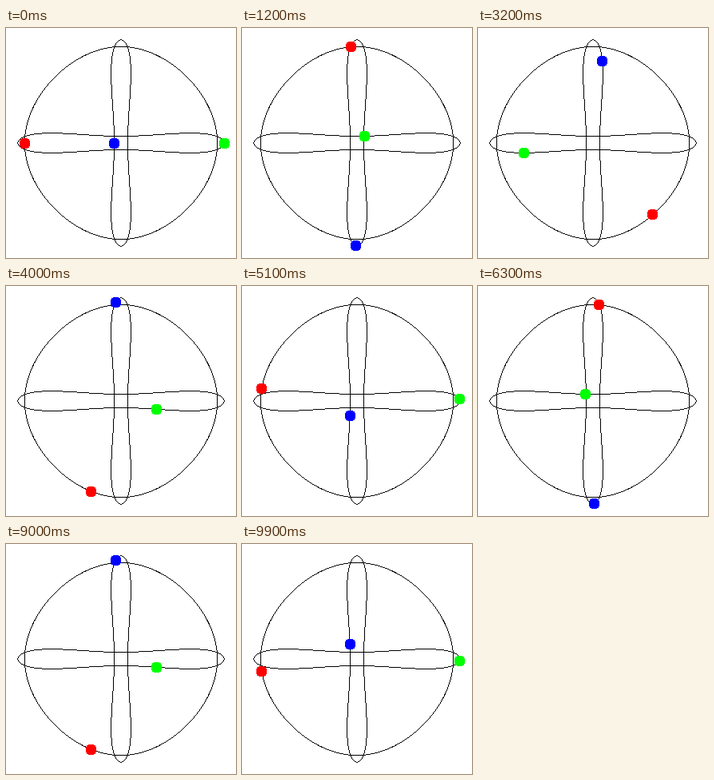
Recreate the animation shown at these times as a matplotlib script. Size 288 by 288 pixels, loop 10 s.

```python
import numpy as np
import matplotlib.pyplot as plt
from matplotlib.animation import FuncAnimation
from matplotlib.patches import Circle

SIZE = 288
CENTRE = 143.5
SCALE = 120
RADIUS = 6.5
PERIOD = 2 * np.pi
FRAMES = 100          # two full orbits per loop
PER_ORBIT = FRAMES // 2
SUBSTEPS = 40


def gravity(z):
    """Accelerations of three unit masses at complex positions z."""
    d = z[None, :] - z[:, None]
    r = np.abs(d) + np.eye(3)
    return (d / r**3).sum(axis=1)


def rk4(z, v, h):
    a1 = gravity(z)
    v2 = v + h / 2 * a1
    a2 = gravity(z + h / 2 * v)
    v3 = v + h / 2 * a2
    a3 = gravity(z + h / 2 * v2)
    v4 = v + h * a3
    a4 = gravity(z + h * v3)
    return (z + h / 6 * (v + 2 * v2 + 2 * v3 + v4),
            v + h / 6 * (a1 + 2 * a2 + 2 * a3 + a4))


def solve_orbit():
    """Criss-cross periodic solution of the planar three-body problem."""
    z = np.array([-1.00496, 1.07590, -0.07095], dtype=complex)
    v = 1j * np.array([1.03678, 0.19509, -1.23187])
    steps = PER_ORBIT * SUBSTEPS
    path = [z]
    for _ in range(steps):
        z, v = rk4(z, v, PERIOD / steps)
        path.append(z)
    return np.array(path)


def to_pixel(v):
    return np.rint(v).astype(int)


def trace(canvas, x, y):
    """Plot a one-pixel curve: one pixel per step along its steeper axis."""
    t = np.arange(len(x))
    fine = np.linspace(0, t[-1], 20 * t[-1] + 1)
    x, y = np.interp(fine, t, x), np.interp(fine, t, y)
    steep = np.abs(np.gradient(y)) > np.abs(np.gradient(x))
    major = np.where(steep, y, x)
    on = np.abs(major - np.rint(major)) < 0.04
    canvas[to_pixel(y[on]), to_pixel(x[on])] = 1


orbit = solve_orbit()
xs = CENTRE + SCALE * orbit.real
ys = CENTRE - SCALE * orbit.imag

canvas = np.zeros((SIZE, SIZE))
for x, y in zip(xs.T, ys.T):
    trace(canvas, x, y)

fig = plt.figure(figsize=(SIZE / 72, SIZE / 72), dpi=72, facecolor="white")
ax = fig.add_axes([0, 0, 1, 1])
ax.imshow(canvas, cmap="binary", interpolation="nearest", aspect="auto")
ax.axis("off")

dots = [
    ax.add_patch(Circle((0, 0), RADIUS, color=color, lw=0, antialiased=False))
    for color in ("#ff0000", "#00ff00", "#0000ff")
]


def update(frame):
    k = frame % PER_ORBIT * SUBSTEPS
    for dot, x, y in zip(dots, to_pixel(xs[k]), to_pixel(ys[k])):
        dot.center = x, y
    return dots


anim = FuncAnimation(fig, update, frames=FRAMES, interval=100,
                     repeat=True, repeat_delay=0)
plt.show()
```
